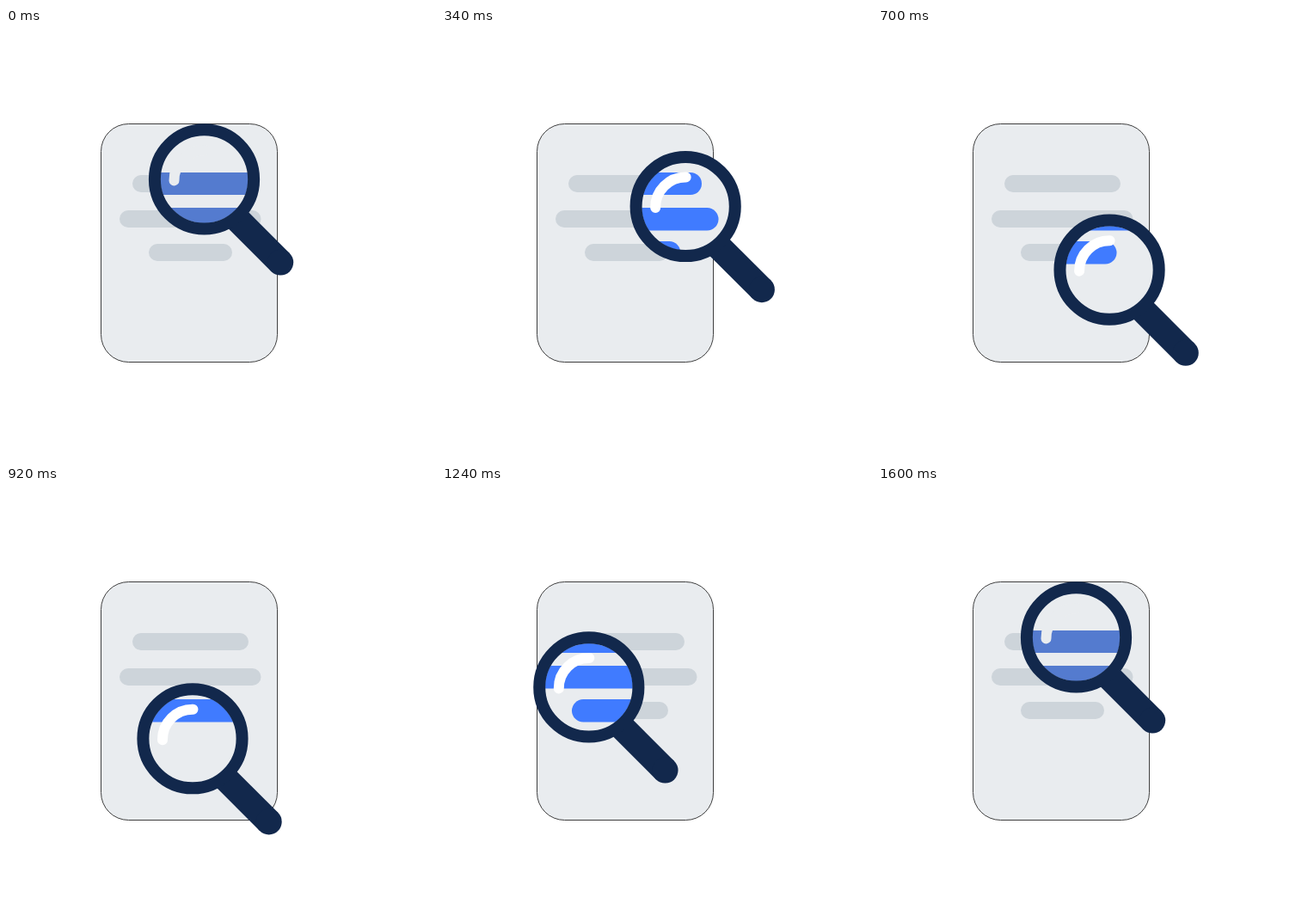
Animation of 500x500 px, one loop 1620 ms. Source, as an HTML page:

```html
<!DOCTYPE html>
<html lang="en">
<head>
<meta charset="utf-8">
<title>Document search</title>
<style>
  html, body { margin: 0; width: 100%; height: 100%; overflow: hidden; background: #fff; }
  svg { display: block; width: 100%; height: 100%; }
</style>
</head>
<body>
<svg viewBox="0 0 500 500">
  <defs>
    <clipPath id="glass"><circle id="hole" r="51"/></clipPath>
  </defs>
  <rect x="110.5" y="111.5" width="205" height="277" rx="32" fill="#e9ecef" stroke="#2b2b2b" stroke-width="0.9"/>
  <g fill="#cdd4da">
    <rect x="147" y="171" width="135" height="20" rx="10"/>
    <rect x="132" y="212" width="164.500" height="20" rx="10"/>
    <rect x="166" y="251" width="97" height="20" rx="10"/>
  </g>
  <circle id="pane" r="54" fill="#e9ecef"/>
  <g clip-path="url(#glass)">
    <g id="bars">
      <rect x="127" y="168" width="175" height="26" rx="13"/>
      <rect x="107" y="209" width="214.500" height="26.500" rx="13.250"/>
      <rect x="151" y="248" width="126.500" height="26.500" rx="13.250"/>
    </g>
  </g>
  <g id="lens" fill="none">
    <path id="shine" d="M-35 1.500A35 35 0 0 1 0.500 -34" stroke-width="12" stroke-linecap="round"/>
    <path d="M39 47L88.700 96.700" stroke="#12284c" stroke-width="30"/>
    <circle cx="88.700" cy="96.700" r="15" fill="#12284c"/>
    <circle r="57.600" stroke="#12284c" stroke-width="14"/>
  </g>
</svg>
<script>
  const LOOP = 1620, STEP = 20, CYCLE = 1600, PULSE = CYCLE / 3;
  const CENTER = [230.5, 235.6], RADIUS = 59.7;
  const TURNS = [0, 494, 866.7, 1233.3, 1600];
  const BLUE = [64, 123, 255], GREY = [111, 122, 139];
  const WHITE = [255, 255, 255], PALE = [233, 236, 239];

  const $ = id => document.getElementById(id);
  const lens = $('lens'), hole = $('hole'), pane = $('pane'), bars = $('bars'), shine = $('shine');

  const clamp = v => Math.max(0, Math.min(1, v));
  const mix = (a, b, k) => `rgb(${a.map((v, i) => Math.round(v + (b[i] - v) * k))})`;

  // Quarter turns, clockwise from the top
  function angle(t) {
    let i = 0;
    while (i < 3 && t >= TURNS[i + 1]) i++;
    return (i + (t - TURNS[i]) / (TURNS[i + 1] - TURNS[i])) * Math.PI / 2;
  }

  // Rises from a to b and falls from c to d around each pulse
  const fade = (p, a, b, c, d) => clamp((p - a) / (b - a)) * clamp((d - p) / (d - c));

  function draw(t) {
    const a = angle(t);
    const x = CENTER[0] + RADIUS * Math.sin(a);
    const y = CENTER[1] - RADIUS * Math.cos(a);
    const move = `translate(${x.toFixed(2)} ${y.toFixed(2)})`;
    for (const el of [lens, hole, pane]) el.setAttribute('transform', move);

    let p = t % PULSE;
    if (p > PULSE / 2) p -= PULSE;
    bars.setAttribute('fill', mix(BLUE, GREY, fade(p, -38, 53, 60, 160)));
    shine.setAttribute('stroke', mix(WHITE, PALE, fade(p, -110, -5, 45, 150)));
  }

  const start = performance.now();
  function tick() {
    const t = (performance.now() - start) % LOOP;
    draw(Math.floor(t / STEP) * STEP % CYCLE);
    requestAnimationFrame(tick);
  }
  tick();
</script>
</body>
</html>
```
